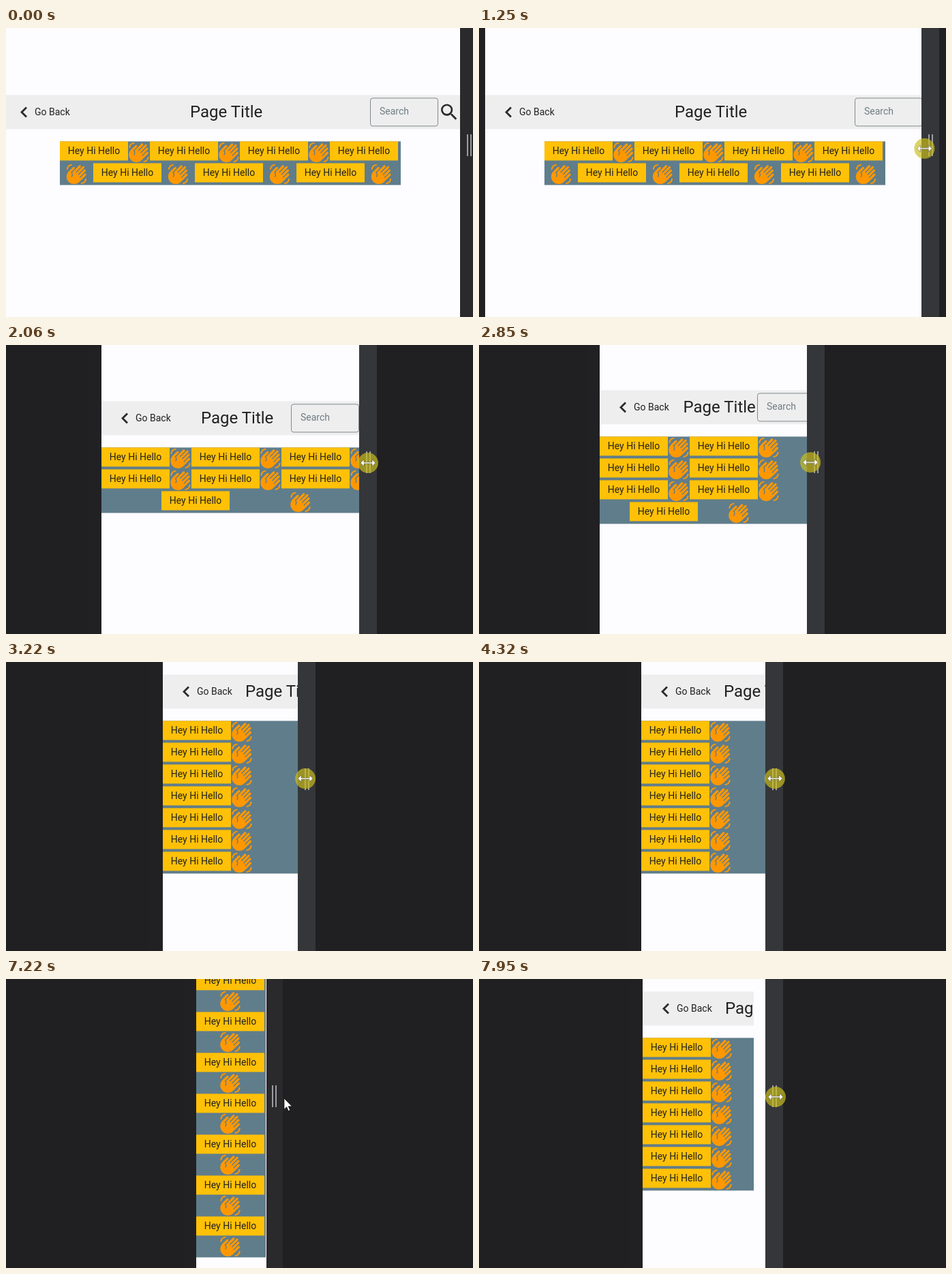
Recreate the animation shown at these times as an HTML page. Size 685x424 px, loop 7990 ms.

```html
<!DOCTYPE html>
<html lang="en">
<head>
<meta charset="utf-8">
<title>Responsive wrap</title>
<style>
  html, body { margin: 0; width: 100%; height: 100%; overflow: hidden; background: #202022; }
  #stage { position: relative; width: 685px; height: 424px; overflow: hidden; font: 14px Roboto, sans-serif; color: #212121; }
  #stage div, #stage svg { position: absolute; white-space: nowrap; }
  #grip { top: 0; width: 19px; height: 424px; background: #212123; }
  #panel { top: 0; width: 26px; height: 424px; background: #2a2a2d; }
  #panel.hover { background: #35363a; }
  #panel div { top: 156px; width: 2px; height: 32px; background: #9c9da0; }
  #view { top: 0; height: 424px; overflow: hidden; background: #fdfcff; }
  #page { left: 0; top: 0; transform: translateY(.4px); }
  #header { left: 0; height: 50px; overflow: hidden; background: #eee; }
  #back { left: 50px; top: 0; line-height: 50px; }
  #name { top: 0; line-height: 50px; font-size: 24px; }
  #search { top: 0; width: 132px; height: 50px; }
  #field { box-sizing: border-box; left: 0; top: 4px; width: 100px; height: 42px; border: 1px solid #80898e; border-radius: 4px; padding-left: 13px; line-height: 39px; color: #6f7d83; }
  #wrap { background: #607d8b; }
  .button, .hand { left: 0; top: 0; }
  .button { width: 100px; height: 28px; line-height: 28px; text-align: center; background: #ffc107; }
  .hand { width: 32px; height: 32px; fill: #ff9800; }
  #cursor { left: 0; top: 0; overflow: visible; }
</style>
</head>
<body>
<div id="stage">
  <div id="grip"></div>
  <div id="panel"><div style="left:10px"></div><div style="left:15px"></div></div>
  <div id="view">
    <div id="page">
      <div id="header">
        <svg style="left:28px;top:16px" width="14" height="18"><path d="M10 2 3 9l7 7" fill="none" stroke="#2b2b2b" stroke-width="2.8"/></svg>
        <div id="back">Go Back</div>
        <div id="name">Page Title</div>
        <div id="search">
          <div id="field">Search</div>
          <svg style="left:100px;top:9px" width="32" height="32" viewBox="0 0 24 24"><path fill="#2b2b2b" d="M15.5 14h-.79l-.28-.27A6.47 6.47 0 0 0 16 9.5 6.5 6.5 0 1 0 9.5 16c1.61 0 3.09-.59 4.23-1.57l.27.28v.79l5 4.99L20.49 19l-4.99-5zm-6 0a4.5 4.5 0 1 1 0-9 4.5 4.5 0 0 1 0 9z"/></svg>
        </div>
      </div>
      <div id="wrap"></div>
    </div>
  </div>
  <svg id="cursor" width="1" height="1">
    <circle id="press" r="15" fill="#cbbf1c" fill-opacity=".68"/>
    <path id="resize" d="M-11 0-6-5V-1H6V-5L11 0 6 5V1H-6V5Z" fill="#fffdee" stroke="#444" stroke-width=".5"/>
    <path id="arrow" d="M0 0V16.5L3.8 13 6.3 18.8 9 17.6 6.5 12H11.8Z" fill="#fff" stroke="#111"/>
  </svg>
</div>
<svg width="0" height="0" style="position:absolute">
  <symbol id="wave" viewBox="0 0 24 24"><path d="M23 17c0 3.31-2.69 6-6 6v-1.5c2.48 0 4.5-2.02 4.5-4.5H23zM1 7c0-3.31 2.69-6 6-6v1.5C4.52 2.5 2.5 4.52 2.5 7H1zm7.01-2.68l-4.6 4.6c-3.22 3.22-3.22 8.45 0 11.67s8.45 3.22 11.67 0l7.07-7.07c.49-.49.49-1.28 0-1.77-.49-.49-1.28-.49-1.77 0l-4.42 4.42-.71-.71 6.54-6.54c.49-.49.49-1.28 0-1.77s-1.28-.49-1.77 0l-5.83 5.83-.71-.71 6.89-6.89c.49-.49.49-1.28 0-1.77s-1.28-.49-1.77 0l-6.89 6.89-.71-.7 5.48-5.48c.49-.49.49-1.28 0-1.77s-1.28-.49-1.77 0l-7.62 7.62c1.22 1.57 1.11 3.84-.33 5.28l-.71-.71c1.17-1.17 1.17-3.07 0-4.24l-.35-.35 4.07-4.07c.49-.49.49-1.28 0-1.77-.49-.49-1.28-.49-1.77 0z"/></symbol>
</svg>
<script>
const LOOP = 7990, ENTER = 30, GRAB = 1140, RELEASE = 5830, LEAVE = 6310, RETURN = 6780, REGRAB = 7440;
const GRAB_OFFSET = 14, MIRROR = 658, EDGE_LAG = 42;
const $ = id => document.getElementById(id);
const clamp = (v, lo, hi) => Math.min(hi, Math.max(lo, v));

// Pointer glides: start, end, x, y and ease-out power.
const START = { x: 670, y: 400 };
const GLIDES = [
  [ENTER, 200, 640, 132, 1],
  [200, 290, 680, 177.5],
  [GRAB, 1920, 537, 174, 1.34],
  [1960, 2060, 531],
  [2200, 2310, 524.5],
  [2680, 3390, 434, 171],
  [4320, 4960, 393.5, 171],
  [RELEASE, LEAVE, 625, 430, 1],
  [LEAVE, RETURN, 659, 422],
  [RETURN, 7220, 408, 175],
  [7220, REGRAB, 393.5, 171],
  [7610, 7950, 435, 173, 1.8],
];

function pointer(t) {
  let { x, y } = START;
  for (const [start, end, toX, toY = 173, power = 2] of GLIDES) {
    const p = 1 - (1 - clamp((t - start) / (end - start), 0, 1)) ** power;
    x += (toX - x) * p;
    y += (toY - y) * p;
  }
  return { x, y };
}

// The edge follows the pointer only while it is held.
function edgeAt(t) {
  const held = t < REGRAB ? clamp(t, GRAB, RELEASE) : t;
  return pointer(held).x - GRAB_OFFSET;
}

const items = Array.from({ length: 14 }, (_, i) => {
  const isButton = i % 2 === 0;
  $('wrap').insertAdjacentHTML('beforeend', isButton
    ? '<div class="button">Hey Hi Hello</div>'
    : '<svg class="hand"><use href="#wave"/></svg>');
  return { el: $('wrap').lastElementChild, w: isButton ? 100 : 32, h: isButton ? 28 : 32 };
});

function place(el, box) {
  for (const key in box) el.style[key] = box[key] + 'px';
}

// Fill rows, shrink to the widest one, and space every row evenly in that width.
function layoutItems(max) {
  const rows = [];
  for (const item of items) {
    let row = rows[rows.length - 1];
    if (!row || row.w + item.w > max) rows.push(row = { w: 0, h: 0, list: [] });
    row.list.push(item);
    row.w += item.w;
    row.h = Math.max(row.h, item.h);
  }
  const widest = Math.max(...rows.map(r => r.w));
  let top = 0;
  for (const row of rows) {
    const gap = (widest - row.w) / (row.list.length + 1);
    let left = gap;
    for (const item of row.list) {
      item.el.style.transform = `translate(${left}px, ${top}px)`;
      left += item.w + gap;
    }
    top += row.h;
  }
  return top;
}

function layoutPage(width) {
  const wrapWidth = Math.min(500, width);
  const height = layoutItems(wrapWidth);
  const top = 198 - height / 2;
  const gap = Math.max(0, (width - 360) / 2);
  place($('wrap'), { left: (width - wrapWidth) / 2, top, width: wrapWidth, height });
  place($('header'), { top: top - 68, width });
  place($('name'), { left: 121 + gap });
  place($('search'), { left: 228 + 2 * gap });
}

function drawPointer(t, edge) {
  const { x, y } = pointer(t);
  const shown = t >= ENTER && !(t >= LEAVE && t < RETURN);
  const pressed = (t >= GRAB && t < RELEASE) || t >= REGRAB;
  const over = shown && (pressed || (x >= edge && x < edge + 26));
  const show = (id, on) => {
    $(id).style.display = on ? '' : 'none';
    $(id).setAttribute('transform', `translate(${x} ${y})`);
  };
  show('press', pressed);
  show('resize', over);
  show('arrow', shown && !over);
  $('panel').classList.toggle('hover', over);
}

function draw() {
  const t = performance.now() % LOOP;
  const edge = edgeAt(t - EDGE_LAG);
  const panel = Math.round(edge);
  // The left side trails while the view grows; wider pages re-lay out later.
  const left = Math.round(MIRROR - Math.min(edge, edgeAt(t - 2 * EDGE_LAG)));
  const layoutLag = edge - 262;
  const width = Math.max(102, Math.round(2 * edgeAt(t - layoutLag) - MIRROR));
  place($('view'), { left, width: Math.max(panel - left, 103) });
  place($('grip'), { left: left - 19 });
  place($('panel'), { left: panel });
  layoutPage(width);
  drawPointer(t, panel);
  requestAnimationFrame(draw);
}
draw();
</script>
</body>
</html>
```
